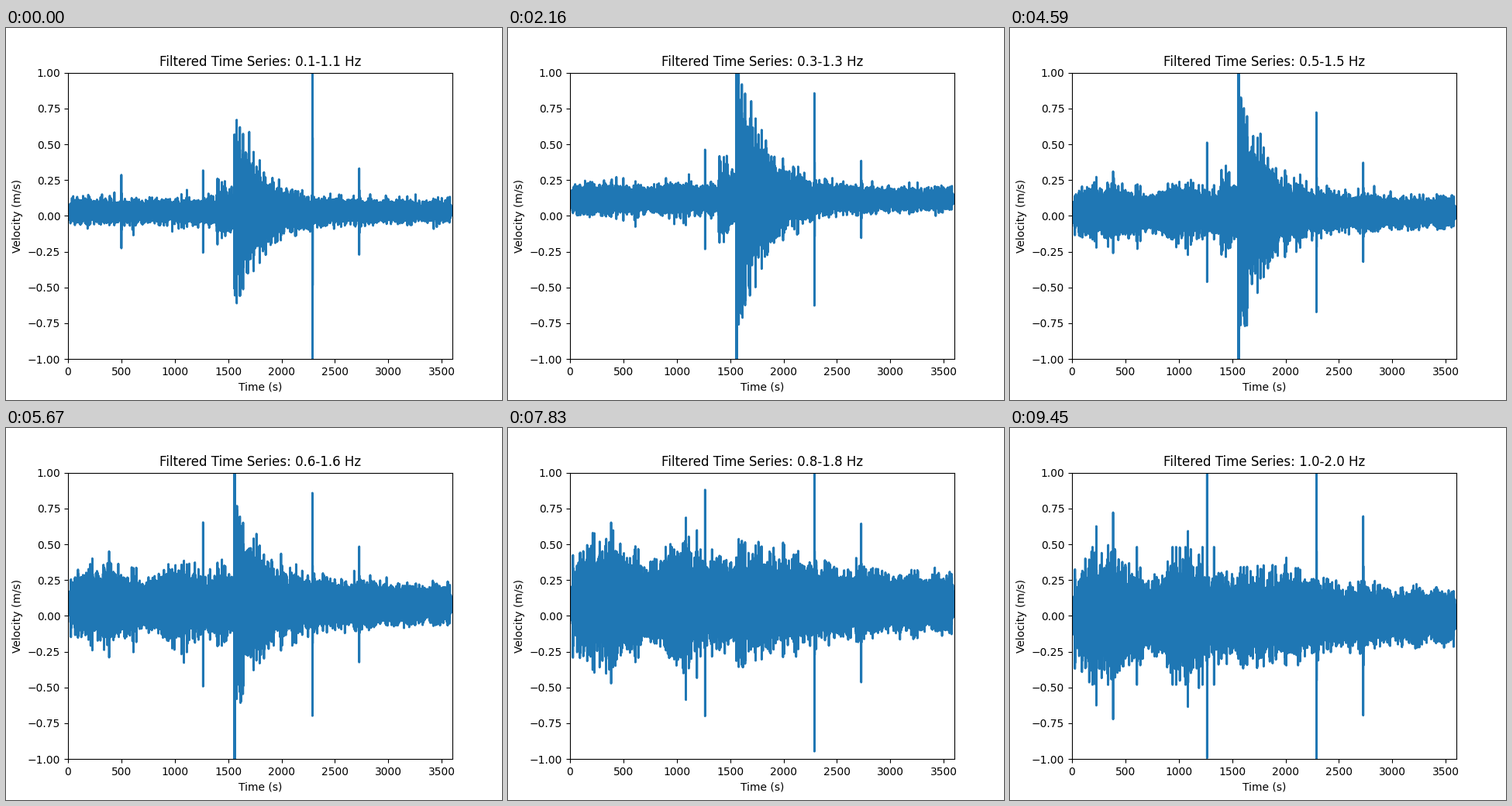
Recreate the animation shown at these times as a matplotlib script. Size 640 by 480 pixels, loop 9720 ms.

```python
import numpy as np
import matplotlib.pyplot as plt
from matplotlib.animation import FuncAnimation

FRAMES, INTERVAL = 36, 270
RATE, SPAN = 6, 3600
SHOCK, FORESHOCK = 1556, 1390

CLICKS = [192, 608, 942, 975, 1063, 1222, 1330]
AFTERSHOCKS = [1400, 1580, 1610, 1640, 1738, 1795]

time = np.arange(0, SPAN, 1 / RATE)
freq = np.fft.rfftfreq(time.size, 1 / RATE)
spectrum = np.fft.rfft(np.random.default_rng(4).normal(size=time.size))
taper = np.interp(time, [0, 30, 3570, 3600], [0.3, 1, 1, 0.2])


def bump(x, centre, width):
    return np.exp(-((x - centre) / width) ** 2)


def decay(start, tau):
    """Zero before start, then one falling exponentially."""
    return np.where(time >= start, np.exp(-np.maximum(time - start, 0) / tau), 0)


traffic = bump(time, 330, 280) + bump(time, 1040, 220) + 0.4 * bump(time, 1900, 500)
coda = 0.85 * decay(SHOCK, 340) + 0.33 * decay(FORESHOCK, 400)


def band_noise(low, high):
    """Unit-variance noise through a fourth-order band-pass."""
    f = np.maximum(freq, 1e-6)
    ratio = (f * f - low * high) / (f * (high - low))
    out = np.fft.irfft(spectrum / np.sqrt(1 + ratio ** 8), time.size)
    return out / out.std()


def envelope(low):
    """Half height of the signal: steady hum plus the earthquake."""
    hum = (0.08 + 0.12 * bump(low, 0.86, 0.28)) * (1 + 1.25 * low * traffic)
    quake = 0.68 * bump(low, 0.36, 0.45) * coda
    return np.hypot(hum, quake)


def pulses(low, env):
    """Yield time and height of each pulse; its strength depends on the band."""
    broad = 0.28 + 0.75 * low ** 2
    deep = np.exp((0.1 - low) / 0.15)
    sharp = low ** 1.5
    yield 500, 0.3 * broad + 0.17 * deep
    yield 1265, broad
    yield 2289, 1.3 * broad + 1.1 * deep
    yield 2727, 0.7 * broad + 0.1 * deep
    yield 228, 0.65 * sharp
    yield 385, 0.75 * sharp
    for t in CLICKS:
        yield t, 0.5 * sharp
    for t in AFTERSHOCKS:
        yield t, 1.3 * env[t * RATE]
    for t in (SHOCK, SHOCK + 8):
        yield t, 1.8 * bump(low, 0.43, 0.3)


def trace(low, high):
    env = envelope(low)
    y = env * taper * band_noise(low, high) / 2.45
    for t, height in pulses(low, env):
        for k, gain in enumerate((1, 0.5, 0.35)):
            i = t * RATE + 8 * k
            y[i] = max(y[i], gain * height)
            y[i + 1] = min(y[i + 1], -gain * height)
    return y


fig, ax = plt.subplots(figsize=(6.4, 4.8), dpi=100)
line, = ax.plot([], [], color="#1f77b4", lw=2)
title = ax.set_title("")
ax.set(xlim=(0, SPAN), ylim=(-1, 1), xlabel="Time (s)", ylabel="Velocity (m/s)")


def update(n):
    low = 0.1 + 0.025 * n
    high = low + 1
    drift = np.interp(n, [0, 8, 12, 17, 21, 29, 35],
                      [0.03, 0.115, -0.055, 0.025, 0.08, 0.09, 0])
    line.set_data(time, trace(low, high) + drift)
    title.set_text(f"Filtered Time Series: {low:.1f}-{high:.1f} Hz")
    return line, title


anim = FuncAnimation(fig, update, frames=FRAMES, interval=INTERVAL,
                     repeat=True, repeat_delay=0, blit=False)
plt.show()
```
